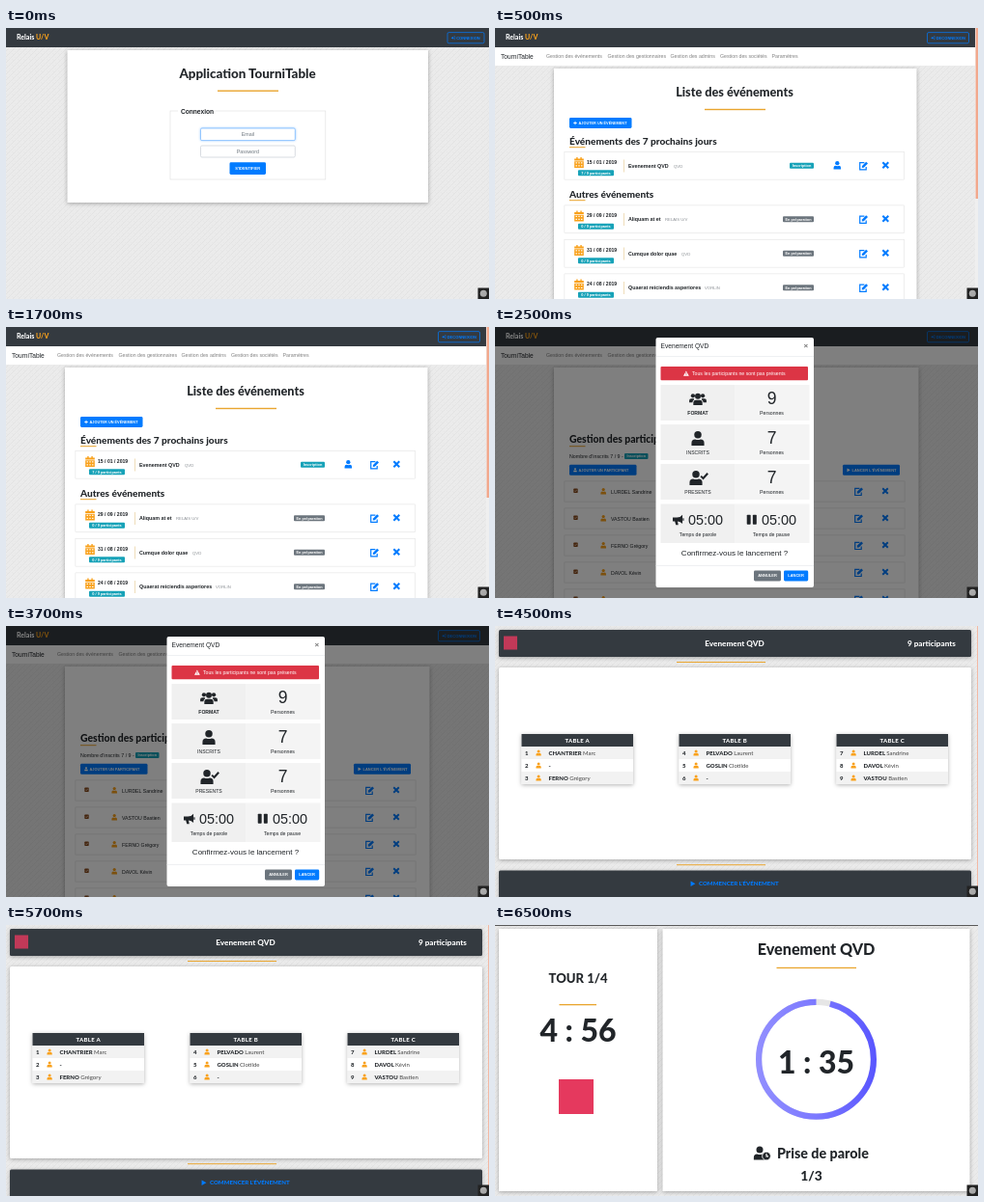
An HTML page that plays this animation: 500x281 px, repeating every 8 s.

```html
<!DOCTYPE html>
<html lang="fr">
<head>
<meta charset="utf-8">
<title>Gestion des événements</title>
<style>
  html, body { margin: 0; width: 100%; height: 100%; overflow: hidden; background: #e9e9e9; }
  svg { display: block; width: 100vw; height: 100vh; }
  text { font-family: "Liberation Sans", Arial, sans-serif; white-space: pre; }
  .b { font-weight: 700; }
  .h { font-family: Lato, sans-serif; font-weight: 800; }
  .wide { letter-spacing: .3px; }
  .m { text-anchor: middle; }
  .deep { filter: drop-shadow(0 1px 2px rgba(0, 0, 0, .3)); }
  .soft { filter: drop-shadow(0 .6px .7px rgba(0, 0, 0, .16)); }
  .glow { filter: drop-shadow(0 0 .9px rgba(0, 123, 255, .45)); }
</style>
</head>
<body>
<svg id="stage" viewBox="0 0 500 281" preserveAspectRatio="none" xmlns="http://www.w3.org/2000/svg">
  <defs>
    <pattern id="weave" width="6" height="6" patternUnits="userSpaceOnUse">
      <rect width="6" height="6" fill="#ebebeb"/>
      <path d="M-1 1L1 -1M0 6L6 0M5 7L7 5" stroke="#e3e3e3" stroke-width="1"/>
      <path d="M0 2L2 4M3 0L5 2" stroke="#e5e5e5" stroke-width=".7"/>
    </pattern>
    <!-- Turned, because the ring itself is rotated a quarter back -->
    <linearGradient id="violet" gradientTransform="rotate(90 .5 .5)">
      <stop offset="0" stop-color="#918eff"/>
      <stop offset=".5" stop-color="#7c79ff"/>
      <stop offset="1" stop-color="#5a57ff"/>
    </linearGradient>
  </defs>
</svg>
<script>
const BLUE = '#007bff', DARK = '#343a40', INK = '#212529', GREY = '#6c757d',
      TEAL = '#17a2b8', ORANGE = '#f9a11b', GOLD = '#e9a52f', LOGO = '#e5395e';

// Icons are drawn in a 16 x 16 box
const user = '<circle cx="8" cy="4" r="4"/><path d="M1 16V13Q1 9 5 9Q8 10.4 11 9Q15 9 15 13V16Z"/>';
const ICONS = {
  user,
  calendar: '<path fill-rule="evenodd" d="M1 2.2H4V0H6V2.2H10V0H12V2.2H15V5H1ZM1 6H15V16H1ZM3 7.6V9.4H5V7.6ZM7 7.6V9.4H9V7.6ZM11 7.6V9.4H13V7.6ZM3 12V13.8H5V12ZM7 12V13.8H9V12ZM11 12V13.8H13V12Z"/>',
  edit: '<path d="M9 3H1.2V15H12V10" fill="none" stroke="currentColor" stroke-width="2"/><path d="M5 8.5L12 1.5L15 4.5L8 11.5L4.6 12Z"/>',
  cross: '<path d="M2.5 2.5L13.5 13.5M13.5 2.5L2.5 13.5" stroke="currentColor" stroke-width="3.8"/>',
  play: '<path d="M2 0.5L15 8L2 15.5Z"/>',
  plus: '<path d="M8 1V15M1 8H15" stroke="currentColor" stroke-width="3.6"/>',
  enter: '<path d="M0 6H5V2L11 8L5 14V10H0Z"/><path d="M10 2H15V14H10" fill="none" stroke="currentColor" stroke-width="2"/>',
  warn: '<path fill-rule="evenodd" d="M8 0.5L16 15H0ZM7 5V10H9V5ZM7 11.5V13.3H9V11.5Z"/>',
  check: '<rect x="1" y="1" width="14" height="14" rx="2"/><path d="M4 8L7 11L12 5" fill="none" stroke="#fff" stroke-width="2"/>',
  pause: '<rect x="1" y="1" width="5.5" height="14" rx="1"/><rect x="9.5" y="1" width="5.5" height="14" rx="1"/>',
  horn: '<path d="M0 5H6Q11 5 14 1V14Q11 10.5 7 10.5L8 15.5H4.5L3 10.5H0Z"/><rect x="14.4" y="6" width="1.6" height="3.5"/>',
  group: '<circle cx="2.6" cy="4.6" r="2.3"/><circle cx="13.4" cy="4.6" r="2.3"/><path d="M-1.5 12V9.5Q-1.5 7.6 1 7.6H3.5Q4.4 8 3.6 9Q2 10 2 12ZM17.5 12V9.5Q17.5 7.6 15 7.6H12.5Q11.6 8 12.4 9Q14 10 14 12Z"/><circle cx="8" cy="5" r="3.2"/><path d="M3 15V12.5Q3 9.4 6 9.2H10Q13 9.4 13 12.5V15Z"/>',
  present: user + '<path d="M13.5 6L16 8.5L21 3" fill="none" stroke="currentColor" stroke-width="2.2"/>',
  clock: user + '<circle cx="16" cy="11.5" r="5" stroke="#fff"/><path d="M16 8.5V11.8H18.3" fill="none" stroke="#fff" stroke-width="1.3"/>'
};

const box = (x, y, w, h, fill, more = '') =>
  `<rect x="${x}" y="${y}" width="${w}" height="${h}" fill="${fill}" ${more}/>`;
const text = (x, y, size, str, cls = '', fill = INK) =>
  `<text x="${x}" y="${y}" font-size="${size}" class="${cls}" fill="${fill}">${str}</text>`;
const icon = (name, x, y, size, color) =>
  `<g transform="translate(${x} ${y}) scale(${size / 16})" fill="${color}" color="${color}">${ICONS[name]}</g>`;
const rule = (x, y, w, h = 1.4) => box(x, y, w, h, GOLD);
const backdrop = box(0, 0, 500, 281, 'url(#weave)');
const corner = box(488.5, 269.5, 11.5, 11.5, '#222') + '<circle cx="494.3" cy="275.3" r="3.5" fill="#aaa"/>';

const button = (x, y, w, h, str, fill = BLUE, size = 4) =>
  box(x, y, w, h, fill, 'rx="1.4"') + text(x + w / 2, y + h / 2 + 1.4, size, str, 'b m', '#fff');
const iconButton = (x, y, w, h, name, str, size = 3.9) =>
  box(x, y, w, h, BLUE, 'rx="1.4"') + icon(name, x + 4, y + h / 2 - 2, 4, '#fff') +
  text(x + 9.5, y + h / 2 + 1.4, size, str, 'b', '#fff');
const badge = (x, y, w, str, fill) =>
  box(x, y, w, 6, fill, 'rx="1"') + text(x + w / 2, y + 4.4, 3.85, str, 'b m', '#fff');

function topBar(label, x, w) {
  return box(0, 0, 500, 20, DARK, 'class="soft"') +
    text(11, 12.4, 7, 'Relais <tspan fill="#f9a11b">U/V</tspan>', 'h', '#fff') +
    box(x, 4.6, w, 11.2, 'none', `rx="1.4" stroke="${BLUE}" stroke-width=".7"`) +
    icon('enter', x + 4, 8.2, 4, BLUE) + text(x + 9.2, 11.8, 4.05, label, 'b', BLUE);
}

function chrome(cardWidth) {
  const links = [[53, 'événements'], [116.5, 'gestionnaires'], [181.5, 'admins'], [233, 'sociétés']];
  return backdrop + box(61, 42, cardWidth, 260, '#fff', 'class="deep"') +
    box(0, 20, 500, 19.5, '#fff', 'class="soft"') + topBar('DECONNEXION', 447.5, 43) +
    text(6, 31.6, 6.6, 'TourniTable') +
    links.map(([x, s]) => text(x, 31.2, 5.24, 'Gestion des ' + s, '', '#808080')).join('') +
    text(286.5, 31.2, 5.24, 'Paramètres', '', '#808080');
}

function login() {
  const field = (y, h, str, stroke, cls) =>
    box(201.5, y, 97.8, h, '#fff', `rx="1.4" stroke="${stroke}" stroke-width=".8" class="${cls}"`) +
    text(250.4, y + h / 2 + 1.9, 5.3, str, 'm', GREY);
  return backdrop + topBar('CONNEXION', 457, 38) +
    box(63.5, 23, 373.5, 158, '#fff', 'class="deep"') +
    text(250, 51.5, 13.4, 'Application TourniTable', 'h m') + rule(219, 64.5, 63) +
    box(170, 86, 160.8, 71, 'none', 'stroke="#e2e2e2" stroke-width=".7"') +
    box(178, 84, 39, 4, '#fff') + text(181, 88.6, 6.6, 'Connexion', 'b') +
    field(104, 12.6, 'Email', '#80bdff', 'glow') + field(122, 12, 'Password', '#ced4da', '') +
    button(231.5, 139.3, 37.5, 12.6, "S'IDENTIFIER");
}

function eventRow(y, date, count, title, tag, tagX, open) {
  return box(72, y, 351.5, 28.5, '#fff', 'class="soft" stroke="#ececec" stroke-width=".5"') +
    icon('calendar', 81.5, y + 5.6, 11, ORANGE) + text(95, y + 12.3, 5.1, date, 'b') +
    badge(86, y + 18.8, 37, count + ' / 9 participants', TEAL) +
    box(133, y + 8, .7, 13, '#e8cf9c') +
    text(138, y + 16.2, 5.35, title, 'b') + text(tagX, y + 16.2, 4.25, tag, '', '#8a8f94') +
    (open ? badge(305, y + 11.3, 25, 'Inscription', TEAL) + icon('user', 350, y + 9.5, 8.6, BLUE)
          : badge(298, y + 11.3, 32, 'En préparation', GREY)) +
    icon('edit', 377, y + 9.4, 9.6, BLUE) + icon('cross', 400, y + 9.5, 8.6, BLUE);
}

function eventList() {
  return chrome(375.5) + text(248, 70.6, 12.7, 'Liste des événements', 'h m') + rule(217, 83.8, 63) +
    iconButton(77, 93, 64.5, 11, 'plus', 'AJOUTER UN ÉVÉNEMENT', 3.85) +
    text(77, 121, 10.1, 'Événements des 7 prochains jours', 'h') + rule(77, 123.2, 16.5, 1) +
    eventRow(128.5, '15 / 01 / 2019', 7, 'Evenement QVD', 'QVD', 185, true) +
    text(77, 176, 10.1, 'Autres événements', 'h') + rule(77, 178.2, 16.5, 1) +
    eventRow(184, '29 / 09 / 2019', 0, 'Aliquam at et', 'RELAIS U/V', 176) +
    eventRow(219.5, '31 / 08 / 2019', 0, 'Cumque dolor quae', 'QVD', 193) +
    eventRow(255, '24 / 08 / 2019', 0, 'Quaerat reiciendis asperiores', 'VORLIN', 217) +
    box(497, 0, 3, 281, '#efefef') + box(497.6, 0, 2.4, 177, '#f2a88c');
}

function launchDialog() {
  const people = ['LURDEL Sandrine', 'VASTOU Bastien', 'FERNO Grégory', 'DAVOL Kévin', ''];
  const rows = people.map((name, i) => {
    const y = 160 + i * 28;
    return box(72, y, 352, 21, '#fff', 'class="soft" stroke="#e6e6e6" stroke-width=".5"') +
      icon('check', 81, y + 7.2, 5, '#8a4b1c') + icon('user', 109, y + 7, 6.4, ORANGE) +
      text(120, y + 13, 5.2, name) +
      icon('edit', 372, y + 5.5, 9.6, BLUE) + icon('cross', 400, y + 6, 8, BLUE);
  }).join('');
  const pair = (y, h) => box(171.5, y, 77, h, '#f0f0f0') + box(248.5, y, 77, h, '#f4f4f4');
  const stat = (y, name, x, label, n, cls) => pair(y, 37) + icon(name, x, y + 7, 15, INK) +
    text(210, y + 30.8, 5.1, label, cls + ' m') +
    text(286.5, y + 20.3, 17.5, n, 'm') + text(286.5, y + 30.8, 5.2, 'Personnes', 'm');
  const timer = (x, name, label) => icon(name, x - 26, 194, 11.5, INK) +
    text(x - 10, 204.5, 14.4, '05:00') + text(x, 217, 5.2, label, 'm');
  const dialog = box(166.5, 11, 163.5, 259, '#fff', 'rx="2"') +
    text(171.5, 22, 6.65, 'Evenement QVD') + text(321.8, 21.8, 8, '×', 'b m', '#777') +
    box(166.5, 30, 163.5, .6, '#e3e6e9') +
    box(171.5, 41, 152.5, 14.3, '#dc3545', 'rx="1"') + icon('warn', 195, 45.2, 5.8, '#fff') +
    text(204, 50, 5.2, 'Tous les participants ne sont pas présents', '', '#fff') +
    stat(60, 'group', 202.5, 'FORMAT', 9, 'b') + stat(101, 'user', 202.5, 'INSCRITS', 7, '') +
    stat(142, 'present', 200.5, 'PRESENTS', 7, '') + pair(183.5, 40.5) +
    timer(210, 'horn', 'Temps de parole') + timer(286, 'pause', 'Temps de pause') +
    text(248, 237.4, 8, 'Confirmez-vous le lancement ?', 'm') + box(166.5, 247, 163.5, .6, '#e3e6e9') +
    button(268, 252.6, 28, 10.8, 'ANNULER', GREY) + button(299, 252.6, 25.2, 10.8, 'LANCER');
  return chrome(377.5) + text(77, 120, 10.4, 'Gestion des participants', 'h') + rule(77, 123.2, 16.5, 1) +
    text(77, 136, 5.3, "Nombre d'inscrits 7 / 9 -") + badge(134, 131, 24.5, 'Inscription', TEAL) +
    iconButton(77, 142.8, 69.5, 11, 'user', 'AJOUTER UN PARTICIPANT') +
    iconButton(360, 142.8, 59, 11, 'play', "LANCER L'ÉVÉNEMENT", 4) + rows +
    box(0, 0, 500, 281, '#000', 'opacity=".5"') + dialog;
}

function tables() {
  const groups = [
    ['A', 27.5, ['CHANTRIER Marc', '-', 'FERNO Grégory']],
    ['B', 190.5, ['PELVADO Laurent', 'GOSLIN Clotilde', '-']],
    ['C', 353.5, ['LURDEL Sandrine', 'DAVOL Kévin', 'VASTOU Bastien']]
  ];
  const table = ([letter, x, names], g) =>
    box(x, 112, 115.5, 52, '#fff', 'class="deep"') + box(x, 112, 115.5, 13, DARK) +
    text(x + 57.8, 120.6, 6, 'TABLE ' + letter, 'h m wide', '#fff') +
    names.map((name, i) => {
      const y = 125 + i * 13, [last, first = ''] = name.split(' ');
      return box(x, y, 115.5, 13, i % 2 ? '#fff' : '#f2f2f2') +
        text(x + 3.5, y + 8.5, 6, g * 3 + i + 1, 'h') + icon('user', x + 14.6, y + 3.4, 6, ORANGE) +
        text(x + 28, y + 8.5, 6, `${last} <tspan font-weight="400" fill="#444">${first}</tspan>`, 'h');
    }).join('');
  return backdrop + box(499, 0, 1, 281, '#f3b9a3') +
    box(4, 4, 489, 28, DARK, 'rx="1.5" class="deep"') + box(9, 10.5, 14, 14, LOGO, 'opacity=".8"') +
    text(248, 21, 8.2, 'Evenement QVD', 'h m', '#fff') + text(427, 21, 8.15, '9 participants', 'h', '#fff') +
    rule(188, 37, 92, 1) + box(4, 43, 489, 199, '#fff', 'rx="1.5" class="deep"') +
    groups.map(table).join('') + rule(188, 247.2, 92, 1) +
    box(4, 253.5, 489, 32, DARK, 'rx="1.5" class="deep"') + icon('play', 201.8, 264.2, 6, BLUE) +
    text(211, 269.3, 6.1, "COMMENCER L'ÉVÉNEMENT", 'h', BLUE);
}

function countdown() {
  const r = 59.4, len = 2 * Math.PI * r, gap = len * 14 / 360;
  const ring = (stroke, more = '') =>
    `<circle cx="332.5" cy="139.3" r="${r}" fill="none" stroke="${stroke}" stroke-width="6.2" ${more}/>`;
  const arc = `stroke-dasharray="0 ${gap} ${len - gap} 0" transform="rotate(-90 332.5 139.3)"`;
  return backdrop + box(0, 0, 500, .9, '#4a4a4a') +
    box(4, 4, 164, 272, '#fff', 'class="deep"') + box(173.5, 4, 318, 272, '#fff', 'class="deep"') +
    text(86, 60, 13.1, 'TOUR 1/4', 'h m') + rule(66.5, 82, 38.5, 1.3) +
    text(86, 120.5, 32, '4 : 56', 'h m') + box(66, 160, 36, 36, LOGO) +
    text(332.5, 31, 16.2, 'Evenement QVD', 'h m') + rule(291.5, 43.8, 82.5, 1.3) +
    ring('#e6e6e6') + ring('url(#violet)', arc) +
    text(332.5, 153.5, 32, '1 : 35', 'h m') + icon('clock', 267, 229.5, 14, INK) +
    text(292, 242, 14.3, 'Prise de parole', 'h') + text(327.5, 264.7, 13.8, '1/3', 'h m');
}

const LOOP = 8000;
const scenes = [[0, login], [500, eventList], [2500, launchDialog], [4500, tables], [6500, countdown]];
const stage = document.getElementById('stage');
stage.insertAdjacentHTML('beforeend', scenes.map(([, draw]) => `<g class="scene">${draw()}</g>`).join('') + corner);

const layers = [...document.querySelectorAll('.scene')];
function tick() {
  const t = performance.now() % LOOP;
  const now = scenes.findLastIndex(([start]) => t >= start);
  layers.forEach((g, i) => { g.style.display = i === now ? '' : 'none'; });
  requestAnimationFrame(tick);
}
tick();
</script>
</body>
</html>
```
